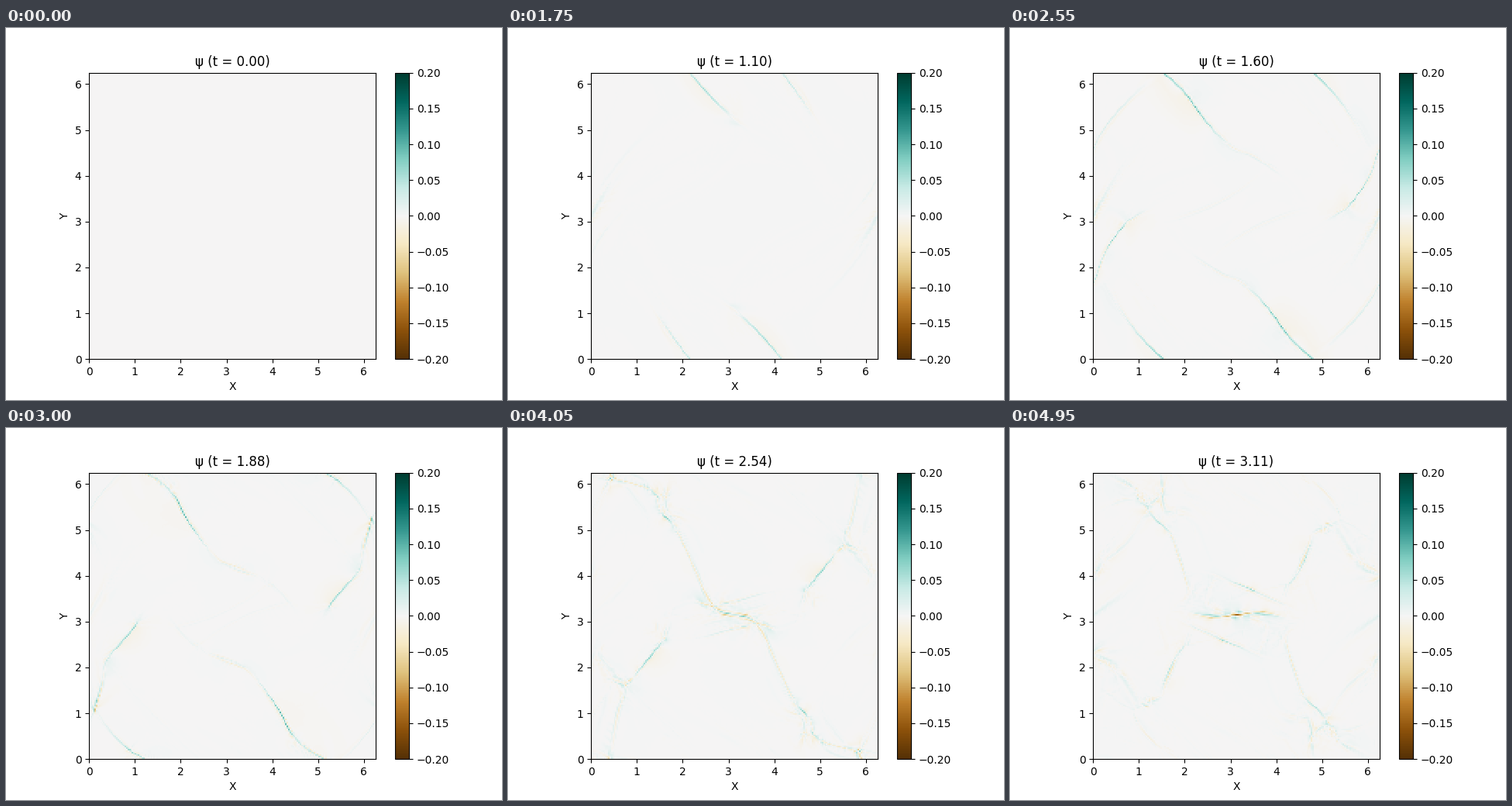
Recreate the animation shown at these times as a matplotlib script. Size 640 px wide and 480 px high, loop 5 s.

```python
"""Divergence-cleaning field of a magnetised vortex (ideal MHD, HLLD and GLM)."""
import math

import numpy as np
import matplotlib.pyplot as plt
from matplotlib.animation import FuncAnimation

FRAMES, INTERVAL = 100, 50
SPAN = math.pi / FRAMES            # model time per frame
N = 200                            # cells per side
M = N // 2 + 1                     # rows kept; the rest follows by symmetry
DX = 2 * math.pi / N
GAMMA = 5 / 3
CFL = 0.4
DAMPING = 0.18
FLOOR = 0.03

# Variables: density, vx, vy, pressure, Bx, By, psi
X_ORDER = (0, 1, 2, 3, 4, 5, 6)
Y_ORDER = (0, 2, 1, 3, 5, 4, 6)
PARITY = np.array([1, -1, -1, 1, -1, -1, 1], np.float32)[:, None, None]


def mirror(a):
    """Reflect the periodic x axis about x = 0."""
    return np.roll(a[..., ::-1], 1, axis=-1)


def pad(w):
    """Two ghost cells: periodic in x, half-turn symmetric in y."""
    g = np.empty((7, M + 4, N + 4), np.float32)
    g[:, 2:-2, 2:-2] = w
    g[:, :2, 2:-2] = PARITY * mirror(w[:, 2:0:-1])
    g[:, -2:, 2:-2] = PARITY * mirror(w[:, -2:-4:-1])
    g[:, :, :2] = g[:, :, -4:-2]
    g[:, :, -2:] = g[:, :, 2:4]
    return g


def half_slope(a, b):
    """Half of the monotonized central slope."""
    slope = 0.25 * (a + b)
    same = a * b > 0
    limit = np.minimum(abs(a), abs(b))
    limit *= same
    np.minimum(slope, limit, out=slope)
    np.maximum(slope, -limit, out=slope)
    return slope


def to_conserved(w):
    r, u, v, p, bx, by, _ = w
    c = w.copy()
    c[1] = r * u
    c[2] = r * v
    c[3] = p / (GAMMA - 1) + 0.5 * (r * (u * u + v * v) + bx * bx + by * by)
    return c


def to_primitive(c):
    w = c.copy()
    r = np.maximum(c[0], FLOOR)
    w[0] = r
    w[1] /= r
    w[2] /= r
    kinetic = c[1] * w[1] + c[2] * w[2]
    magnetic = c[4] * c[4] + c[5] * c[5]
    w[3] = np.maximum((GAMMA - 1) * (c[3] - 0.5 * (kinetic + magnetic)), FLOOR)
    return w


def max_speed(w):
    r, u, v, p, bx, by, _ = w
    fast = np.sqrt((GAMMA * p + bx * bx + by * by) / r)
    return float((np.maximum(abs(u), abs(v)) + fast).max())


def rate(w, hx, hy, ch):
    """Primitive time derivative from half slopes, with the sign reversed."""
    r, u, v, p, bx, by, _ = w
    d = u * hx
    d += v * hy
    div = hx[1] + hy[2]
    current = (hx[5] - hy[4]) / r
    d[0] += r * div
    d[1] += hx[3] / r + current * by
    d[2] += hy[3] / r - current * bx
    d[3] += GAMMA * p * div

    def emf(h):
        return h[1] * by + u * h[5] - h[2] * bx - v * h[4]

    d[4] = hx[6] - emf(hy)
    d[5] = hy[6] + emf(hx)
    d[6] = ch * ch * (hx[4] + hy[5])
    return d


class Side:
    """State on one side of a face, and the waves that leave it."""

    def __init__(self, q, bn, bn2):
        r, u, v, p, _, bt, _ = q
        r = np.maximum(r, FLOOR)
        p = np.maximum(p, FLOOR)
        b2 = bn2 + bt * bt
        e = p / (GAMMA - 1) + 0.5 * (r * (u * u + v * v) + b2)
        a2 = GAMMA * p / r
        total = a2 + b2 / r
        root = np.sqrt(np.maximum(total * total - 4 * a2 * bn2 / r, 0))
        self.fast = np.sqrt(0.5 * (total + root))
        self.r, self.u, self.v, self.bt, self.e = r, u, v, bt, e
        self.pt = p + 0.5 * b2
        self.vb = u * bn + v * bt
        m = r * u
        self.state = (r, m, r * v, e, bt)
        self.flow = (m, m * u + self.pt - bn2, m * v - bn * bt,
                     (e + self.pt) * u - bn * self.vb, bt * u - bn * v)

    def set_star(self, speed, sm, pts, bn, bn2):
        """State between the fast wave and the Alfven wave."""
        d, gap = speed - self.u, speed - sm
        mass = self.r * d
        q = mass * gap - bn2
        flat = abs(q) < 1e-3 * abs(pts)
        q = np.where(flat, 1, q)
        self.vs = np.where(flat, self.v,
                           self.v - bn * self.bt * (sm - self.u) / q)
        self.bs = np.where(flat, self.bt, self.bt * (mass * d - bn2) / q)
        self.rs = np.maximum(mass / gap, FLOOR)
        self.root = np.sqrt(self.rs)
        self.vbs = self.vs * self.bs
        work = bn * (self.vb - sm * bn - self.vbs)
        self.es = (d * self.e - self.pt * self.u + pts * sm + work) / gap
        self.star = (self.rs, self.rs * sm, self.rs * self.vs,
                     self.es, self.bs)

    def flux(self, fast, alfven, vss, bss, turn):
        """Flux with both jumps, given speeds clipped to this side."""
        energy = turn * self.root * (self.vbs - vss * bss)
        inner = (0, 0, self.rs * (vss - self.vs), energy, bss - self.bs)
        return [f + fast * (s - q) + alfven * j for f, s, q, j
                in zip(self.flow, self.star, self.state, inner)]


def face_flux(left, right, order, ch):
    """HLLD flux, with the (Bn, psi) pair solved exactly."""
    ql = [left[i] for i in order]
    qr = [right[i] for i in order]
    bn = 0.5 * (ql[4] + qr[4] - (qr[6] - ql[6]) / ch)
    psi = 0.5 * (ql[6] + qr[6] - ch * (qr[4] - ql[4]))
    bn2 = bn * bn
    l, r = Side(ql, bn, bn2), Side(qr, bn, bn2)

    fast = np.maximum(l.fast, r.fast)
    sl = np.minimum(l.u, r.u) - fast
    sr = np.maximum(l.u, r.u) + fast
    ml, mr = (sl - l.u) * l.r, (sr - r.u) * r.r
    sm = (mr * r.u - ml * l.u - r.pt + l.pt) / (mr - ml)
    pts = (mr * l.pt - ml * r.pt + ml * mr * (r.u - l.u)) / (mr - ml)
    l.set_star(sl, sm, pts, bn, bn2)
    r.set_star(sr, sm, pts, bn, bn2)

    turn = np.sign(bn)
    weight = l.root + r.root
    vss = (l.root * l.vs + r.root * r.vs + turn * (r.bs - l.bs)) / weight
    bss = (l.root * r.bs + r.root * l.bs
           + turn * l.root * r.root * (r.vs - l.vs)) / weight
    size = abs(bn)
    fl = l.flux(np.minimum(sl, 0), np.minimum(sm - size / l.root, 0),
                vss, bss, -turn)
    fr = r.flux(np.maximum(sr, 0), np.maximum(sm + size / r.root, 0),
                vss, bss, turn)

    out = np.empty(left.shape, np.float32)
    from_left = sm > 0
    for k, i in enumerate((0, 1, 2, 3, 5)):
        out[order[i]] = np.where(from_left, fl[k], fr[k])
    out[order[4]] = psi
    out[order[6]] = ch * ch * bn
    return out


def step(c, w, dt, ch):
    k = dt / DX
    g = pad(w)
    mid = g[:, 1:-1, 1:-1]
    hx = half_slope(mid - g[:, 1:-1, :-2], g[:, 1:-1, 2:] - mid)
    hy = half_slope(mid - g[:, :-2, 1:-1], g[:, 2:, 1:-1] - mid)
    half = mid - k * rate(mid, hx, hy, ch)

    rows, cols = slice(1, -1), slice(1, -1)
    fx = face_flux((half + hx)[:, rows, :-1], (half - hx)[:, rows, 1:],
                   X_ORDER, ch)
    fy = face_flux((half + hy)[:, :-1, cols], (half - hy)[:, 1:, cols],
                   Y_ORDER, ch)
    change = fx[:, :, 1:] - fx[:, :, :-1]
    change += fy[:, 1:]
    change -= fy[:, :-1]
    change *= k
    c -= change
    c[6] *= math.exp(-dt * ch / DAMPING)
    return c, to_primitive(c)


def vortex():
    x = DX * np.arange(N)
    y = DX * np.arange(M)[:, None]
    w = np.zeros((7, M, N), np.float32)
    w[0] = GAMMA ** 2
    w[1] = -np.sin(y)
    w[2] = np.sin(x)
    w[3] = GAMMA
    w[4] = -np.sin(y)
    w[5] = np.sin(2 * x)
    return w


def whole(half):
    return np.concatenate([half, mirror(half[-2:0:-1])])


def simulate():
    w = vortex()
    c = to_conserved(w)
    fields = [whole(w[6])]
    for _ in range(FRAMES - 1):
        ch = max_speed(w)
        count = math.ceil(SPAN * ch / (CFL * DX))
        for _ in range(count):
            c, w = step(c, w, SPAN / count, ch)
        fields.append(whole(w[6]))
    return fields


fields = simulate()

fig, ax = plt.subplots(figsize=(6.4, 4.8), dpi=100)
edge = 2 * math.pi - DX
image = ax.imshow(fields[0], cmap="BrBG", vmin=-0.2, vmax=0.2, origin="lower",
                  extent=(0, edge, 0, edge), interpolation="nearest")
fig.colorbar(image, ax=ax)
ax.set_xlabel("X")
ax.set_ylabel("Y")
title = ax.set_title("")


def draw(n):
    image.set_data(fields[n])
    title.set_text(f"ψ (t = {n * SPAN:.2f})")
    return image, title


anim = FuncAnimation(fig, draw, frames=FRAMES, interval=INTERVAL,
                     repeat=True, repeat_delay=0)
plt.show()
```
